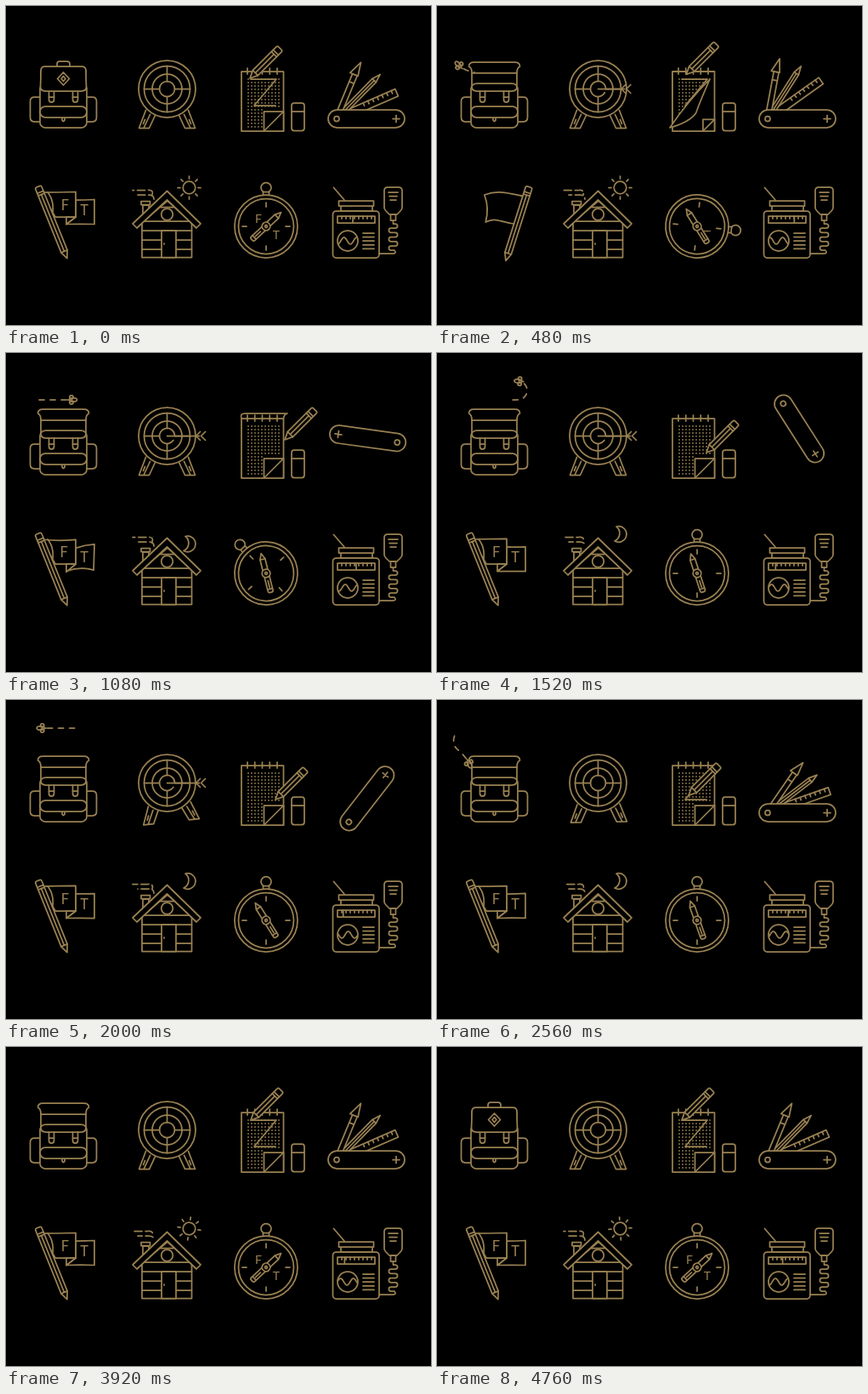
Recreate the animation shown at these times as an HTML page with a canvas. Size 500 px wide and 375 px high, loop 4800 ms.

```html
<!DOCTYPE html>
<html lang="en">
<head>
<meta charset="utf-8">
<title>Camp icons</title>
<style>
  html, body { margin: 0; width: 100%; height: 100%; overflow: hidden; background: #000; }
  canvas { display: block; width: 500px; height: 375px; }
</style>
</head>
<body>
<canvas id="stage"></canvas>
<script>
const LOOP = 4800, STEP = 40, GOLD = '#998152';
const canvas = document.getElementById('stage');
const ctx = canvas.getContext('2d');
const dpr = window.devicePixelRatio || 1;
canvas.width = 500 * dpr;
canvas.height = 375 * dpr;

const { PI, sin, cos, abs, min, max, sign, exp } = Math;
const TAU = PI * 2;
const ramp = (t, a, b) => max(0, min(1, (t - a) / (b - a)));
const ease = (t, a, b) => { const k = ramp(t, a, b); return k * k * (3 - 2 * k); };
// Rises from 0 to 1 between a and b, falls back between c and d.
const visit = (t, a, b, c, d) => ease(t, a, b) - ease(t, c, d);
const mix = (a, b, k) => a + (b - a) * k;
const hop = k => 4 * k * (1 - k);

function line(d) {
  ctx.stroke(new Path2D(d));
}
function solid(d) {
  const p = new Path2D(d);
  ctx.fillStyle = '#000';
  ctx.fill(p);
  ctx.stroke(p);
}
function circle(x, y, r, filled) {
  ctx.beginPath();
  ctx.arc(x, y, r, 0, TAU);
  if (filled) { ctx.fillStyle = '#000'; ctx.fill(); }
  ctx.stroke();
}
function box(x, y, w, h, r = 0) {
  ctx.beginPath();
  ctx.roundRect(x, y, w, h, r);
  ctx.fillStyle = '#000';
  ctx.fill();
  ctx.stroke();
}
function dashed(d, dash, offset = 0) {
  ctx.setLineDash(dash);
  ctx.lineDashOffset = offset;
  line(d);
  ctx.setLineDash([]);
}
function at(x, y, deg, draw, sx = 1, sy = sx) {
  ctx.save();
  ctx.translate(x, y);
  ctx.rotate(deg * PI / 180);
  ctx.scale(sx, sy);
  draw();
  ctx.restore();
}
function spokes(count, d) {
  for (let i = 0; i < count; i++) at(0, 0, i * 360 / count, () => line(d));
}
function label(s, x, y, size) {
  ctx.font = size + 'px Lato, sans-serif';
  ctx.textAlign = 'center';
  ctx.fillStyle = GOLD;
  ctx.fillText(s, x, y);
}
// Tip at the origin, body along -y.
function pencil(len, half) {
  solid(`M0 0 L${-half} -9 V${2 - len} Q${-half} ${-len} ${2 - half} ${-len} H${half - 2} Q${half} ${-len} ${half} ${2 - len} V-9 Z`);
  line(`M${-half} -9 H${half} M${-half} ${7 - len} H${half} M${-half} ${10 - len} H${half} M0 -9 V${10 - len}`);
}

// Backpack and bug
const flight = document.createElementNS('http://www.w3.org/2000/svg', 'path');
flight.setAttribute('d', 'M44 78 Q32 76 25 69 C19 62 22 55 32 55 H95 A11 11 0 0 0 95 33 H36 C18 33 16 52 24 58 Q36 68 40 80 Q56 84 68 92');
const flightEnd = flight.getTotalLength();

function bug(t) {
  const d = (t - 300) * .114;
  if (d <= 0) return;
  const spot = s => flight.getPointAtLength(s);
  for (let back = 7; back < 40; back += 13) {
    const a = max(0, d - back - 6), b = min(flightEnd, d - back);
    if (b <= a) continue;
    ctx.beginPath();
    for (let i = 0; i <= 3; i++) {
      const p = spot(mix(a, b, i / 3));
      ctx.lineTo(p.x, p.y);
    }
    ctx.stroke();
  }
  if (d > flightEnd - 25) return;
  const p = spot(d), q = spot(d + 1);
  at(p.x, p.y, Math.atan2(q.y - p.y, q.x - p.x) * 360 / TAU, () => {
    ctx.beginPath();
    ctx.ellipse(1, 0, 4.5, 2.2, 0, 0, TAU);
    ctx.stroke();
    for (const y of [-3, 3]) circle(-1, y, 2.1);
    line('M-4 0 H-5.5');
  });
}

function flap(k) {
  const hinge = mix(71, 79, k), edge = mix(100, 66, k), mid = (hinge + edge) / 2;
  const r = min(5, abs(edge - hinge) / 2) * sign(edge - hinge), c = abs(r) * (1 - k);
  const l = 40.5 - 3 * k, e = 94.5 + 3 * k;
  solid(`M${41 + c} ${hinge} H${94 - c} Q94 ${hinge} 94 ${hinge + c} Q94 ${mid} ${e} ${edge - r} Q${e} ${edge} ${e - 6} ${edge} H${l + 6} Q${l} ${edge} ${l} ${edge - r} Q41 ${mid} 41 ${hinge + c} Q41 ${hinge} ${41 + c} ${hinge} Z`);
  if (edge > hinge + 4) at(67.5, mid, 0, () =>
    line('M0 -7.5 L7 0 L0 7.5 L-7 0 Z M0 -3 L2.5 0 L0 3 L-2.5 0 Z'), 1, (edge - hinge) / 29);
}

function backpack(t) {
  const k = visit(t, 40, 500, 3980, 4440);
  for (const s of [-1, 1])
    at(67.5, 107, 0, () => line('M27 0 H34 Q39 0 39 5 V24 Q39 29 34 29 H27'), s, 1);
  if (k < .4) box(60, 65 + 25 * k, 15, 9, 3);
  line('M41 76 V96 M94 76 V96');
  solid('M40 125 V97 Q41 91 47 91 H88 Q94 91 95 97 V125');
  box(40, 118, 55, 25, 6);
  line('M40 125 Q41 131 47 131 H88 Q94 131 95 125 M66 131 V134 Q67.5 137 69 134 V131');
  for (const x of [50.5, 78.5]) {
    solid(`M${x} 100 V110 Q${x} 113 ${x + 3} 113 Q${x + 6} 113 ${x + 6} 110 V100`);
    line(`M${x} 107 H${x + 6}`);
  }
  if (k > .5) line('M41 95 Q41 100 47 100 H88 Q94 100 94 95');
  flap(k);
  bug(t);
}

// Target
function target(t) {
  const since = max(0, t - 1840);
  const lean = -9.5 * sin(TAU * since / 640) * exp(-since / 400);
  const shot = visit(t, 260, 560, 2160, 2480);
  at(189.5, 97.5, 0, () => {
    at(0, 0, lean, () => {
      for (const s of [-1, 1])
        at(0, 0, 0, () => line('M25 25 L33 46 H21 L14 31 M27.5 46 L20 30 M26 36 L28 41'), s, 1);
    });
    circle(0, 0, 33.5, true);
    circle(0, 0, 27);
    circle(0, 0, 17.5);
    spokes(4, 'M0 -27 V-9');
    ctx.beginPath();
    ctx.arc(0, 0, 9, .6 * shot, TAU - .1 * shot);
    ctx.stroke();
    const x = 38 * shot;
    if (shot > 0) line(`M0 0 H${x}`);
    if (shot > .7) for (const dx of [1, 7]) line(`M${x + dx} -5 l-5 5 l5 5`);
  });
}

// Notepad
const Z = [[317, 117], [292, 117], [318, 86], [288, 86]];
const zPath = 'M' + Z.join(' L');
const zLegs = Z.slice(1).map((p, i) => Math.hypot(p[0] - Z[i][0], p[1] - Z[i][1]));
const zLength = zLegs.reduce((a, b) => a + b);

function zPoint(s) {
  let i = 0;
  while (i < 2 && s > zLegs[i]) s -= zLegs[i++];
  return [0, 1].map(j => mix(Z[i][j], Z[i + 1][j], s / zLegs[i]));
}
function page(fold, dots, ink) {
  box(277, 77, 49.5, 70);
  ctx.fillStyle = GOLD;
  if (dots)
    for (let y = 86; y < 143; y += 4)
      for (let x = 285; x < 322; x += 4)
        if (x < 325 - fold || y < 145 - fold) ctx.fillRect(x - .8, y - .8, 1.6, 1.6);
  if (ink > 0) dashed(zPath, [ink, 999]);
  if (fold > 1) {
    const x = 326.5 - fold, y = 147 - fold;
    box(x, y, fold, fold);
    line(`M${x} 147 L326.5 ${y}`);
  }
}
function turningPage(t) {
  const a = ease(t, 160, 480), b = ease(t, 480, 960);
  const ax = 326 - 52 * a, ay = 147 - 4 * a - 66 * b;
  const bx = 326 - 5 * a + 6 * b, by = 147 - 61 * a - 14 * b;
  const curl = 22 * a * (1 - b), mx = (ax + bx) / 2, my = (ay + by) / 2;
  ctx.save();
  ctx.clip(new Path2D(`M270 70 H332 L${bx} ${by} L${ax} ${ay} ${a < 1 ? 'V148 H270' : ''} Z`));
  page(23, true, zLength);
  ctx.restore();
  solid(`M${ax} ${ay} Q${mx - 3} ${my - 2} ${bx} ${by} Q${mx + curl / 2} ${my} ${mx + curl / 3} ${my + curl / 2} Q${mx} ${my + curl} ${ax} ${ay} Z`);
}
function notepad(t) {
  const ink = zLength * ramp(t, 2100, 3500);
  if (t < 160) page(23, true, zLength);
  else page(23 * ease(t, 200, 700), t > 680, ink);
  if (t >= 160 && t < 960) turningPage(t);
  if (t >= 960 && t < 1240) {
    const y = 71 + 6 * ease(t, 1100, 1240);
    solid(`M277 77 Q275 ${y} 281 ${y} H331 Q327 ${y + 1} 326.5 77 Z`);
  }
  for (let i = 0; i < 5; i++) line(`M${284 + 8.75 * i} 73 V80`);
  box(336, 114, 15, 32.5, 3);
  line('M336 124 H351');
  let [x, y] = zPoint(ink);
  if (t < 2100) {
    const out = ease(t, 280, 1080), back = ease(t, 1120, 1500);
    x = 287 + 41 * out - 11 * back;
    y = 85 + 17 * out + 15 * back - 9 * hop(ramp(t, 240, 1080));
  }
  at(x, y, 45, () => pencil(50, 4.3));
}

// Pocket knife
function knife(t) {
  const open = 1 - visit(t, 480, 740, 2180, 2700);
  const extra = 12 * visit(t, 40, 480, 480, 700);
  const lift = 44 * hop(ramp(t, 740, 2150));
  const blade = (angle, draw) => at(-35, 0, -angle * open - extra, draw);
  at(424 + lift * .05, 132.5 - lift, 720 * ramp(t, 720, 2100), () => {
    if (open > 0) {
      blade(23.5, () => {
        box(0, -4.5, 77, 9);
        for (let x = 36; x < 75; x += 6) line(`M${x} -4.5 v3.5`);
      });
      blade(45.5, () => {
        solid('M0 -3 H63 L73 0 L63 3 H0 Z');
        line('M0 0 H63 M63 -3 V3');
      });
      blade(67.5, () => {
        box(0, -3, 56, 6);
        solid('M56 -6 L72 1 L56 4 Z');
        line('M46 -3 V3');
      });
    }
    box(-45, -10.5, 90, 21, 10.5);
    circle(-35, 0, 3);
    line('M31 0 H39 M35 -4 V4');
  });
}

// Flag
function flag(t) {
  const k = visit(t, 40, 480, 560, 960);
  const cx = 55 + 39.5 * k, cy = 255 + 1.5 * k + (t < 500 ? 10 * hop(k) : 0), tilt = -22 + 39.6 * k;
  if (t > 120 && t < 920) {
    const w = 49 * (1 - 2 * visit(t, 120, 440, 580, 920));
    const a = tilt * PI / 180;
    const pole = v => [cx - sin(a) * v, cy + cos(a) * v];
    const [x0, y0] = pole(-34), [x1, y1] = pole(0), ex = x0 + w, ey = 222;
    solid(`M${x0} ${y0} C${x0 + w * .3} ${y0 - 2} ${ex - w * .4} ${ey - 7} ${ex} ${ey} Q${ex - w * .12} ${ey + 15} ${ex - w * .03} ${ey + 32} C${ex - w * .3} ${ey + 25} ${x1 + w * .4} ${y1 - 1} ${x1} ${y1} Z`);
  } else {
    const w = t > 900 ? 5 * cos((t - 1080) / 110) * exp((920 - t) / 260) : 0;
    solid(`M82 ${228 + w / 2} Q93 ${228 - w} 104 ${227.5 - w} L${104 - w / 3} ${256.5 - w / 2} Q88 ${256 - w * 2} 71 256.5 L82 248 Z`);
    solid(`M41 219 Q62 ${219 + w} 82 ${218.5 + w / 3} V248 H58 Z`);
    solid(`M71 248 V${256.5 + w / 3} L82 248 Z`);
    line('M49 219 Q58 230 54 248');
    label('F', 69.5 - w / 2, 240, 16.5);
    label('T', 92, 246, 16.5);
  }
  at(cx, cy, tilt, () => {
    ctx.translate(0, 45);
    pencil(91, 3.9);
  });
}

// House
function sky(t) {
  const day = 1 - visit(t, 560, 800, 3560, 3840);
  const night = visit(t, 840, 1000, 3360, 3560);
  if (day > .02) at(215.5, 213.5, 45 * t / 480, () => {
    circle(0, 0, 7.3);
    spokes(8, 'M0 -10.5 V-13.5');
  }, day);
  if (night > .02) at(214, 236 - 23 * ease(t, 840, 1320), 0, () =>
    line('M-3 -9 A9.3 9.3 0 1 1 -5 8 A10 10 0 0 0 -3 -9 Z'), night);
}
function house(t) {
  sky(t);
  const drift = -t * 52 / LOOP;
  dashed('M172 222 Q174 216 167 216.5 H149', [9, 4], drift);
  dashed('M174 227 Q174 222 168 222 H155', [9, 4], drift);
  solid('M161 248 V234 H168 V242');
  box(159, 229.5, 10.5, 4);
  solid('M160 254 V295.5 H218.5 V254 L190 229 Z');
  for (let y = 253; y < 290; y += 11) line(`M160 ${y} H218.5`);
  line('M182 236.5 H197');
  box(183, 264, 17, 31.5);
  line('M186 279 V280');
  circle(189.5, 245, 6.8, true);
  solid('M149 256 L189.5 217.5 L229 256 L224 261 L189.5 228 L154 261 Z');
}

// Compass
function compass(t) {
  at(306, 259, 180 * (1 - cos(PI * ramp(t, 0, 1390))), () => {
    circle(0, -45.5, 6);
    box(-3.5, -40.5, 7, 4);
    circle(0, 0, 37, true);
    circle(0, 0, 32.5);
    spokes(4, 'M0 -23 V-28');
  });
  const letter = (s, x, y, delay) => {
    const shown = 1 - visit(t - delay, 160, 400, 2600, 2840);
    ctx.save();
    ctx.beginPath();
    ctx.rect(x - 8, y - 11, 16, 12 * shown);
    ctx.clip();
    label(s, x, y, 14);
    ctx.restore();
  };
  letter('F', 297, 254.5, 0);
  letter('T', 318, 273.5, 160);
  const swing = 69 * visit(t, 40, 480, 2400, 3800);
  const sway = 10 * visit(t, 40, 480, 2000, 2600) * cos(TAU * (t - 480) / 1520);
  at(306, 259, 47 - swing - sway, () => {
    solid('M0 -24 L3 -17 V21 Q3 23 1 23 H-1 Q-3 23 -3 21 V-17 Z');
    line('M-3 -17 H3 M0 9 V17 M-3 19 H3');
    circle(0, 0, 4.8, true);
    circle(0, 0, 1.4);
  });
}

// Radio
function radio(t) {
  line('M385.5 213.5 L398 228');
  box(394, 235, 37, 6);
  box(391.5, 229, 41, 6);
  box(384.5, 241, 54.5, 55, 4);
  box(390, 247, 44, 8);
  for (let x = 395; x < 432; x += 5) line(`M${x} 247 v3`);
  line(`M${408 + 13 * sin(TAU * t / 2400)} 247 V255`);
  circle(402, 276, 12);
  ctx.beginPath();
  for (let x = -11; x <= 11; x++)
    ctx.lineTo(402 + x, 276 - 4 * sin(x * TAU / 15 + TAU * t / 1200 + 3.4));
  ctx.stroke();
  for (let y = 267; y < 287; y += 4.6) line(`M420 ${y} H433`);
  solid('M449 213 H462 Q466 213 466 217 V237 Q466 239 464 241 L460 245 H451 L447 241 Q445 239 445 237 V217 Q445 213 449 213 Z');
  for (let i = 0; i < 3; i++) line(`M${450 + i} ${219 + 4.5 * i} H${461 - i}`);
  box(452.5, 245, 6, 7);
  line('M455.5 252 V256 ' + 'H458 a2.6 2.6 0 0 1 0 5.2 H453 a2.6 2.6 0 0 0 0 5.2 '.repeat(3) + 'H457 Q460 291 455 291 H439');
  // Short signal pulses
  for (const from of [3480, 4040]) {
    const k = (t - from) / 320;
    if (k < 0 || k > 1) continue;
    ctx.beginPath();
    ctx.arc(455.5, 228, 16 + 10 * k, -.4, .4);
    ctx.stroke();
  }
}

function draw(t) {
  ctx.setTransform(dpr, 0, 0, dpr, 0, 0);
  ctx.fillStyle = '#000';
  ctx.fillRect(0, 0, 500, 375);
  ctx.strokeStyle = GOLD;
  ctx.lineWidth = 1.75;
  ctx.lineCap = ctx.lineJoin = 'round';
  for (const icon of [backpack, target, notepad, knife, flag, house, compass, radio]) icon(t);
}

const start = performance.now();
function tick() {
  const t = (performance.now() - start) % LOOP;
  draw(Math.floor(t / STEP) * STEP);
  requestAnimationFrame(tick);
}
tick();
</script>
</body>
</html>
```
